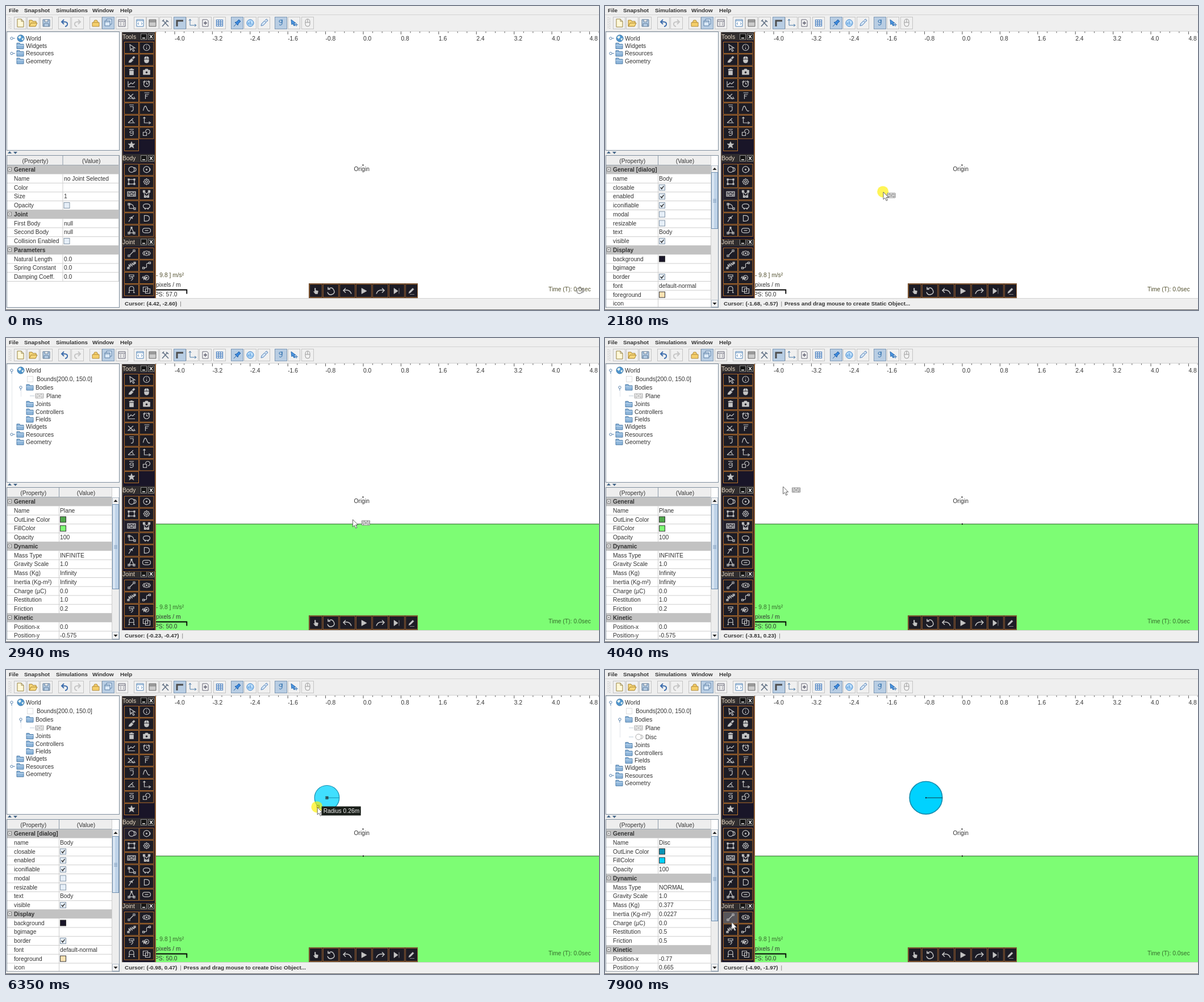
Recreate the animation shown at these times as an HTML page. Size 1044x536 px, loop 8000 ms.

```html
<!DOCTYPE html>
<html lang="en">
<head>
<meta charset="utf-8">
<title>Physics sandbox</title>
<style>
html,body{margin:0;width:100%;height:100%;overflow:hidden;background:#fff}
svg{display:block;width:1044px;height:536px;font:10.3px "Liberation Sans",Arial,sans-serif}
text{white-space:pre;fill:#333}
.b{font-weight:bold;font-size:9.9px}
</style>
</head>
<body>
<svg id="stage" viewBox="0 0 1044 536"><g id="fixed"></g><g id="live"></g></svg>
<script>
const LOOP = 8000, PX = 83, OX = 629, OY = 281;
const ORANGE = '#b5702b', NAVY = '#191528', CELL = '#1d1c25', ICON = '#c4c4c4';

const rect = (x, y, w, h, fill, stroke = 'none', extra = '') =>
  `<rect x="${x}" y="${y}" width="${w}" height="${h}" fill="${fill}" stroke="${stroke}" ${extra}/>`;
const path = (d, stroke = '#333', fill = 'none', w = 1, extra = '') =>
  `<path d="${d}" stroke="${stroke}" fill="${fill}" stroke-width="${w}" ${extra}/>`;
const circle = (x, y, r, fill, stroke = 'none', extra = '') =>
  `<circle cx="${x}" cy="${y}" r="${r}" fill="${fill}" stroke="${stroke}" ${extra}/>`;
const text = (x, y, s, extra = '') => `<text x="${x}" y="${y + 3.6}" ${extra}>${s}</text>`;
const bold = (x, y, s, extra = '') => text(x, y, s, `class="b" ${extra}`);
const at = (x, y, s) => `<g transform="translate(${x} ${y})">${s}</g>`;
const ring = r => `M${-r} 0a${r} ${r} 0 1 0 ${2 * r} 0a${r} ${r} 0 1 0 ${-2 * r} 0`;
const BRICK = 'M-7-4h14v8h-14zM-7-1.3h14M-7 1.4h14M-3-4v2.7M3-4v2.7M0-1.3v2.7M-4 1.4v2.6M4 1.4v2.6';
const DISC = ring(5) + 'M4-3.5q4 0 4 3.5t-4 3.5';

// ---------- toolbar ----------
const SHEET = 'M-5-7h7l4 4v10h-11zM2-7v4h4';
const TOOLBAR = [
  [25, SHEET, '#998440', '#fff8d8'], [48, 'M-7 6v-11h5l1 2h6v3M-7 6l3-6h11l-3 6z', '#a8822d', '#f6d77b'],
  [71, 'M-6-6h12v12h-12zM-3-6v4h6v-4M-4 6v-5h8v5', '#5d7896', '#b9d0e8'],
  [103, 'M-1-6l-4 4 4 4M-5-2h5q6 0 5 5q-1 3-4 3', '#3f6fae', 'none', 0, 2],
  [126, 'M1-6l4 4-4 4M5-2h-5q-6 0-5 5q1 3 4 3', '#c6c6c6', 'none', 0, 2],
  [158, 'M-6-1h12v7h-12zM-4-1l2-4h4l2 4', '#b18b3c', '#f5cf6a'],
  [180, 'M-6-4h9v9h-9zM-3-4v-3h9v9h-3M-6-2h9', '#5a7fa5', '#dceaf8', 1],
  [204, 'M-6-6h12v12h-12zM-6-3h12M-3 0h2M2 0h2M-3 3h2M2 3h2', '#667', '#eee'],
  [236, 'M-6-6h12v12h-12zM-6-4h12M-2-1l-2 2 2 2M2-1l2 2-2 2', '#5285b8', '#fff'],
  [258, 'M-6-6h12v12h-12zM-6-2h12M-6-4h12', '#666', '#ccc'],
  [281, 'M-6 6l8-9M-5-5l10 11M1-5l4 3M-6-3l3-3', '#637286', 'none', 0, 1.6],
  [306, 'M-5 6v-10h11', '#4d4d4d', 'none', 1, 3],
  [328, 'M-4-7v11h11M-6-4l2-3 2 3M4 2l3 2-3 2', '#4a7aa8', 'none'],
  [351, 'M-5-6h8l2 2v10h-10zM-3 0h6M0-3v6' + ring(2), '#667', '#f4f4f4'],
  [376, 'M-5.5-6v12M-1.8-6v12M1.8-6v12M5.5-6v12M-6-5.5h12M-6-1.8h12M-6 1.8h12M-6 5.5h12', '#4a82c4', 'none', 0, 1.2],
  [407, 'M-6 6l4-4M-4-1l5 5 1-3 4-4-3-3-4 4z', '#225fa6', '#3d89dc', 1],
  [430, ring(6) + 'M-3 3v-4M0 3v-6M3 3v-2', '#337fca', '#b9dcfa'],
  [454, 'M-5 5l1-4 5-5 3 3-5 5zM2-5l3-2 2 3-3 2', '#5b86bb', '#cfe2f4'],
  [484, 'M2-5q-5-1-5 2t5 2v-5v8q-2 3-5 1', '#2b6cab', 'none', 1],
  [507, 'M-5-6l1 9 2-2 2 4 2-1-2-4h3zM1 3h6M4 0v6', '#276bb2', '#4b94df'],
  [531, 'M-4-2q0-5 4-5t4 5v4q0 4-4 4t-4-4zM-4-1h8M0-7v6', '#999', '#f3f3f3']
];

function toolbar() {
  let s = rect(0, 0, 1044, 45, '#efefef') + path('M0 15.5h1044M0 44.5h1044', '#d2d2d2');
  [[5, 'File'], [32, 'Snapshot'], [88, 'Simulations'], [152, 'Window'], [201, 'Help']]
    .forEach(([x, label]) => s += bold(x, 7, label));
  for (let y = 20; y < 41; y += 3) s += rect(5, y, 1, 1, '#999') + rect(8, y + 1, 1, 1, '#999');
  for (const [x, d, stroke, fill, on, weight] of TOOLBAR)
    s += rect(x - 10.5, 19.5, 21, 21, on ? '#b8cde3' : '#f0f0f0', on ? '#7f99b5' : '#c4c4c4') +
      at(x, 30, path(d, stroke, fill, weight));
  return s;
}

// ---------- dark tool panels; "*" marks a solid icon ----------
const TOOLS = ['M-3-5l1 10 2-3 3 5 2-1-3-5h4z', ring(5.5) + 'M0-3v1M0 0v3', '*M-5 5l1-3 4-4 3 3-4 4zM1-3l3-3 2 2-3 3z',
  '*M-4-1.5q0-4 3.5-4v4zM.5-5.5q3.5 0 3.5 4h-3.5zM-4 0h8v2q0 4-4 4t-4-4z', '*M-4-3h8v-1.5h-2.5v-1h-3v1h-2.5zM-3.5-1.5h7v7h-7z',
  '*M-6-3h3l1-2h4l1 2h3v8h-12zM-2 1a2 2 0 1 0 4 0a2 2 0 1 0-4 0',
  'M-6-5v10h12M-5 2l4-4 3 2 4-4', ring(5) + 'M0-3v3h3M-6-3l3-3M6-3l-3-3', 'M-6-4l9 8h-9l9-8M4 1l2 3-4 1',
  'M-2 5v-8h6M-2 0h4M-4-6h9', 'M-3-3h6v5q0 3-4 3M-4-6h8', 'M-6 4q3-13 6-5t6 5',
  'M-6 4h12M-6 4l9-8M0-1q3 1 3 5', 'M-4-6v10h9M-6-4l2-2 2 2M4 2l3 2-3 2', 'M3-3q-6-1-6 2t6 1v-3v6q-2 3-6 1M-4-6h8',
  'M-6-1h6v6h-6zM-2-2a4 4 0 1 1 4 4', '*M0-6l1.6 4H6L2.5 1 4 5.5 0 3l-4 2.5L-2.5 1-6-2h4.4z'];
const BODIES = [DISC, ring(5.5) + ring(1) + 'M5-3q3 3 0 6', 'M-5-4h10v8h-10zM-6-5h2v2h-2zM4-5h2v2h-2zM-6 3h2v2h-2zM4 3h2v2h-2z',
  ring(2) + ring(4.5) + 'M0-6v2M0 6v-2M-6 0h2M6 0h-2M-4-4l1 1M4 4l-1-1M4-4l-1 1M-4 4l1-1', BRICK,
  'M-5-5l2 10h6l2-10-5 5zM-6-6h3v3h-3zM3-6h3v3h-3zM-4 3h3v3h-3zM1 3h3v3h-3z', 'M-4 4v-8q8 0 8 8zM-6-5h3v3h-3zM4 3h3v3h-3z',
  'M-6 0q0-4 6-4t6 4-6 4-6-4M-4 3l2 3M4 3l-2 3', 'M-5 6l4-6 5-5M-4-1h6M-1-3l3 4', 'M-4-5h3q6 0 6 5t-6 5h-3z',
  'M0-5l-4 9h8zM-1-6h2v2h-2zM-6 3h3v3h-3zM3 3h3v3h-3z', 'M-3-4h6q4 0 4 4t-4 4h-6q-4 0-4-4t4-4M-3 0h6'];
const JOINTS = ['M-3 3l6-6M-6 3h3v3h-3zM3-6h3v3h-3z', ring(4) + ring(1) + 'M-7 0l3-4M-7 0l3 4M7 0l-3-4M7 0l-3 4',
  'M-6 5l2-3-1-4 3 4 0-5 3 4 0-5 3 3 2-4M-7 3h3v3h-3zM4-6h3v3h-3z', 'M-5 4q6 1 5-4t5-4M-7 3h3v3h-3zM4-6h3v3h-3z',
  'M-4-5h8v3h-8zM0-2q5 4-1 7M-4 1h4', 'M-8 1l2-3 1 5 2-5 1 5 2-4' + ring(4) + ring(1), 'M-4 5v-7q0-4 4-4t4 4v7M-4 1h8M-6 5h3M3 5h3',
  'M-6-5h8v8h-8zM-2-2h8v8h-8z'];
const PLAYER = [[534, 22, '*M-2 1v-6h1.5v4l4.5 1-1 5h-4l-3-4z'], [558, 27, 'M-4-4q6-4 9 2t-3 8q-6 2-8-4M-5-7v4h4'],
  [587, 27, 'M-3-5l-4 4 4 4M-7-1q11-3 14 6'], [616, 27, '*M-4-5l9 5-9 5z'], [645, 27, 'M3-5l4 4-4 4M7-1q-11-3-14 6'],
  [674, 27, '*M-5-5l7 5-7 5zM4-5v10'], [703, 21, '*M-5 4l1-3 6-6 2 2-6 6zM-3 6h8']];

const glyph = (d, w = 1.2) => path(d.replace('*', ''), ICON, d[0] === '*' ? ICON : 'none', d[0] === '*' ? .6 : w, 'fill-rule="evenodd"');
const cell = (x, y, d, back = CELL, edge = ORANGE) => rect(x - 12.5, y - 9.5, 25, 20, back, edge) + at(x, y, glyph(d));

function panel(top, bottom, title, titleY, firstY, icons) {
  let s = rect(204, top, 60, bottom - top, NAVY) + rect(204, top, 60, 15, '#302d2e') +
    path(`M205 ${top}V${bottom}`, '#4c413c', 'none', 2) + path(`M263 ${top}V${bottom}`, '#8a5a30', 'none', 2) +
    text(205, titleY, title, 'style="fill:#eadbc6"');
  for (const x of [242.5, 255.5]) s += rect(x - 5, titleY - 5, 10, 10, '#151515', '#8a8a8a');
  s += path(`M240 ${titleY + 2.5}h5M253 ${titleY - 3}l5 6m0-6l-5 6`, '#eee', 'none', 1.5);
  icons.forEach((d, i) => s += cell(221 + 26.5 * (i % 2), firstY + 21.5 * (i >> 1), d));
  return s;
}

function fixedScene() {
  let s = rect(0, 0, 1044, 536, '#fff') + toolbar();
  for (let v = -22; v <= 25; v++) {
    const x = OX + v * 0.2 * PX;
    s += path(`M${x} 45v${v % 4 ? 2.5 : 5}`, '#555');
    if (v % 4 === 0) s += text(x, 57, (v / 5).toFixed(1));
  }
  s += rect(0, 45, 204, 490, '#ededed') + rect(1.5, 45.5, 198, 209, '#fff', '#7f8f9f') +
    rect(1.5, 263.5, 198, 268, '#fff', '#7f8f9f') + path('M3 260l3.5-4 3.5 4zM13 257l3.5 4 3.5-4z', 'none', '#446688');
  return s + rect(204, 515, 840, 20, '#efefef') + path('M204 515.5h840', '#d0d0d0') + path('M0 535.5h1044', '#666');
}

// ---------- side panel ----------
const folder = (x, y) => at(x, y, path('M-6 5v-10h5l1 2h6v8z', '#4d7ca8', '#8db5da') + path('M-6-1h12', '#c9def1'));
const handle = (x, y, open) => circle(x, y, 2.2, '#fff', '#5b83ad') + path(open ? `M${x} ${y + 2}v4` : `M${x + 2} ${y}h4`, '#5b83ad');

function tree(bodies) {
  let s = at(26, 57, circle(0, 0, 6, '#4f96cf', '#3b77a8') + path('M-5-2l4-3 2 3-3 3zM1 1l4-2-1 5z', 'none', '#e9f3ef')) + text(35, 57, 'World');
  let y = 57;
  const entry = (x, step, label) => { y += step; s += folder(x - 10, y) + text(x, y, label); };
  s += handle(10, 57, bodies.length);
  if (bodies.length) {
    s += rect(37.5, 67.5, 10, 10, 'none', '#bbb', 'stroke-dasharray="1 1"') + text(54, 72, 'Bounds[200.0, 150.0]');
    s += handle(26, 87, true) + path(`M26.5 92V${88 + 15.5 * bodies.length}M10.5 63v103`, '#e2e6ea');
    y = 72;
    entry(52, 15, 'Bodies');
    bodies.forEach((name, i) => {
      y += 15 + i;
      s += path(`M42 ${y}h8`, '#bccbd8') + at(59, y, path(name === 'Disc' ? DISC : BRICK, '#aaa')) + text(71, y, name);
    });
    entry(52, 14.6, 'Joints'); entry(52, 13.5, 'Controllers'); entry(52, 13.3, 'Fields');
  }
  entry(35, 13.3, 'Widgets'); entry(35, 13.3, 'Resources');
  s += handle(10, y, false);
  entry(35, 13.3, 'Geometry');
  return s;
}

// "#" starts a heading; "+" and "-" are check boxes; "@" is a colour swatch
const SHEETS = {
  joint: '#General|Name=no Joint Selected|Color=|Size=1|Opacity=-|#Joint|First Body=null|Second Body=null|Collision Enabled=-|#Parameters|Natural Length=0.0|Spring Constant=0.0|Damping Coeff.=0.0',
  dialog: '#General [dialog]|name=Body|closable=+|enabled=+|iconifiable=+|modal=-|resizable=-|text=Body|visible=+|#Display|background=@#191528|bgimage=|border=+|font=default-normal|foreground=@#ffe3b3|icon=',
  plane: '#General|Name=Plane|OutLine Color=@#4fa94b|FillColor=@#7dfd74|Opacity=100|#Dynamic|Mass Type=INFINITE|Gravity Scale=1.0|Mass (Kg)=Infinity|Inertia (Kg-m²)=Infinity|Charge (µC)=0.0|Restitution=1.0|Friction=0.2|#Kinetic|Position-x=0.0|Position-y=-0.575',
  disc: '#General|Name=Disc|OutLine Color=@#0b93b5|FillColor=@#00d2ff|Opacity=100|#Dynamic|Mass Type=NORMAL|Gravity Scale=1.0|Mass (Kg)=0.377|Inertia (Kg-m²)=0.0227|Charge (µC)=0.0|Restitution=0.5|Friction=0.5|#Kinetic|Position-x=-0.77|Position-y=0.665'
};

function properties(kind) {
  const wide = kind === 'joint', split = wide ? 100 : 93.5, right = wide ? 198.5 : 186.5, vx = split + 1.5;
  let s = rect(2, 264, right - 2, 17, '#eee') + path(`M2 280.5H${right}M${split} 264v17`, '#8c9aa8') +
    text((split + 3) / 2, 273, '(Property)', 'text-anchor="middle"') +
    text((split + right) / 2 + 1, 273, '(Value)', 'text-anchor="middle"');
  SHEETS[kind].split('|').forEach((row, i) => {
    const y = 288.5 + 15.75 * i, h = Math.min(15.75, 531 - (y - 7.8));
    if (row[0] === '#') {
      s += rect(2, y - 7.8, right - 2, h, '#c2c2c2') + rect(3.5, y - 3.5, 6, 6, '#fff', '#777') +
        path(`M5 ${y - .5}h3`, '#222') + bold(14, y, row.slice(1), 'style="font-size:10.2px"');
      return;
    }
    const [name, value] = row.split('=');
    s += path(`M2 ${y - 7.8 + h}H${right}M${split} ${y - 7.8}v${h}`, '#cdcdcd') + text(14, y, name);
    if (value === '+' || value === '-') {
      s += rect(vx + .5, y - 5, 10, 10, '#e6eff8', '#8193a5');
      if (value === '+') s += path(`M${vx + 2.7} ${y - .3}l2 2.7 3.8-5`, '#333', 'none', 1.5);
    } else if (value[0] === '@') s += rect(vx + .5, y - 5, 10, 10, value.slice(1), '#333');
    else s += text(wide ? vx + .5 : vx, y, value);
  });
  s += path(`M${right} 264V${wide ? 486 : 531}`, '#cdcdcd');
  if (!wide) {
    const end = kind === 'dialog' ? 392 : 442, mid = (294 + end) / 2;
    s += rect(187, 281, 12, 250, '#ededed') + rect(187.5, 281.5, 11, 12, '#f3f3f3', '#b7c3cf') +
      rect(187.5, 518.5, 11, 12, '#f3f3f3', '#b7c3cf') + path('M189.5 289l3.5-4 3.5 4zM189.5 523l3.5 4 3.5-4z', 'none', '#222') +
      rect(187.5, 293.5, 11, end - 293, '#bfd3e8', '#6f8fb0') + rect(188, 294, 4, end - 294, '#dbe7f3') +
      path(`M190 ${mid - 2}h6m-6 2.5h6m-6 2.5h6`, '#7897b8');
  }
  return s;
}

// ---------- timeline ----------
const PATH = [[0, 996, 497], [100, 860, 440], [210, 712, 392], [400, 620, 290], [520, 470, 205], [740, 370, 225],
  [850, 290, 270], [960, 240, 315], [1080, 222, 328], [1630, 330, 326], [1730, 489.5, 328], [2290, 505, 328],
  [2400, 540, 328], [2510, 585, 327.5], [2620, 614, 327.5], [2940, 610, 320], [3050, 600, 300], [3160, 588, 278],
  [3270, 575, 258], [3380, 562, 245], [3490, 553, 240], [4040, 313, 262], [4160, 285, 264], [4380, 250, 276],
  [4490, 224, 287], [5240, 350, 268], [5360, 565, 225.5], [5890, 560, 230], [6010, 556, 233.5], [6120, 553, 236],
  [6230, 550, 239], [6350, 547.7, 242], [6450, 545, 243.5], [6570, 543, 246], [7220, 470, 285], [7340, 298, 362],
  [7560, 262, 395], [7680, 238, 425], [7790, 227, 440], [7900, 222.5, 444.5]];
const RADII = [[5670, 0], [5780, 2], [5890, 7], [6010, 11], [6120, 15], [6230, 18.5], [6350, 21.8], [6450, 26], [6570, 28.8]];
const latest = (steps, t) => steps.findLast(step => step[0] <= t);
const within = (t, a, b) => t >= a && t < b;
const grip = (x, y) => rect(x - 2, y - 2, 4, 4, 'none', '#222');

function plane(t, x) {
  const drag = t < 2720;
  let s = rect(264, 328, 780, 187, drag ? '#9dfc96' : '#7dfd74') + path('M264 328h780', drag ? '#4e8a4c' : '#245c22');
  return s + (drag ? grip(489.5, 328) + grip(x, 328) : rect(628, 327, 2, 2, '#111'));
}

function disc(t, x, y) {
  const r = latest(RADII, t)[1], drag = t < 6570, cx = 565, cy = 225.3;
  let s = circle(cx, cy, r, drag ? '#40dfff' : '#00d2ff', '#168eb0', `stroke-width="${drag ? 1.2 : 1.7}"`) +
    path(`M${cx} ${cy}h${r}`, drag ? '#168eb0' : '#123c48');
  if (!drag) return s + rect(cx - 1, cy - 1, 2, 2, '#123');
  const angle = Math.atan2(y - cy, x - cx);
  return s + grip(cx, cy) + rect(cx - 1, cy - 1, 2, 2, '#222') + grip(cx + r * Math.cos(angle), cy + r * Math.sin(angle));
}

function pointer(t, x, y) {
  const pressed = within(t, 1190, 1420) || within(t, 2180, 2720) || within(t, 4810, 5030) || within(t, 5670, 6680);
  const dragging = within(t, 2290, 2720) || within(t, 5780, 6570);
  let s = pressed ? circle(x - .3, y - .6, 10, '#fff000', 'none', 'opacity=".66"') : '';
  if (x > 264 && !dragging) {
    const brick = within(t, 1630, 4490);
    s += brick ? at(x + (t < 2720 ? 14.5 : 23.5), y + 6, path(BRICK, '#888', '#eee'))
      : at(x + 13.5, y + 5, path(DISC, '#8c8c8c', 'none', 1.3));
  }
  if (t >= 100) s += path(`M${x + .5} ${y}v13l3-2.7 2.2 5 2.2-1-2.2-4.8h4z`, '#555', '#fff', .9);
  if (dragging) {
    const label = t < 3000 ? 'Angle 0.0°, Slope 0.0' : `Radius ${(latest(RADII, t)[1] / PX).toFixed(2)}m`;
    const left = x + (t < 3000 ? 6.5 : 8);
    s += rect(left, y - 1.5, t < 3000 ? 101.5 : 69, 16, '#1a1f1a') + text(left + 3, y + 6.6, label, 'style="fill:#f2f2f2"');
  }
  return s;
}

function status(t, x, y) {
  const place = `Cursor: (${((x - OX) / PX).toFixed(2)}, ${((OY - y) / PX).toFixed(2)})`;
  const made = within(t, 1300, 2720) ? 'Static' : within(t, 4920, 6570) ? 'Disc' : '';
  const message = made && `Press and drag mouse to create ${made} Object...`;
  return bold(209, 524, `${place}<tspan dx="5" style="font-weight:normal;fill:#777">|</tspan><tspan dx="4">${message}</tspan>`);
}

function liveScene(t) {
  const [, x, y] = latest(PATH, t);
  const kind = t < 1190 ? 'joint' : t < 2720 ? 'dialog' : t < 4810 ? 'plane' : t < 6570 ? 'dialog' : 'disc';
  const fps = t < 400 ? 57 : t < 740 ? 54 : t < 1950 ? 51 : 50;
  const olive = t < 2290 ? 'style="fill:#53512f"' : 'style="fill:#356b2b"';
  let s = tree(t < 2720 ? [] : t < 6570 ? ['Plane'] : ['Plane', 'Disc']) + properties(kind);

  if (t >= 2290) s += plane(t, x);
  s += rect(627.5, 279.5, 2, 2, '#222') + text(612.5, 287, 'Origin');
  if (t >= 5780) s += disc(t, x, y);
  s += text(264, 474, '- 9.8 ] m/s²', olive) + text(264, 491.5, 'pixels / m') +
    path('M264 500.5h54.3v7', '#000', 'none', 1.8) + text(262, 508, `PS: ${fps}.0`) +
    text(955, 499.5, 'Time (T): 0.0sec', olive);

  const bodyEnd = t < 1190 ? 409 : 412;
  s += panel(46, 261, 'Tools', 54, 73, TOOLS) + panel(409, 515, 'Joint', 416, 436, JOINTS) +
    panel(261, bodyEnd, 'Body', 268.5, 288.3, BODIES) + path(`M204 ${bodyEnd - .5}h60`, '#60401f');
  if (within(t, 1080, 4490)) s += cell(221, 331.3, BRICK, '#211e2b', '#494039');
  if (within(t, 4490, 6570)) s += cell(221, 288.3, DISC, '#211e2b', '#665036');
  if (t >= 7790) s += cell(221, 436, JOINTS[0], '#57555b', '#8a6a47');

  s += rect(533.5, 489.5, 191, 25, NAVY, '#6b4a30');
  for (const [left, w, d] of PLAYER)
    s += rect(left + .5, 490.5, w, 23, CELL, '#8f5c2c') + at(left + w / 2 + .5, 502.5, glyph(d, 1.5));
  return s + status(t, x, y) + pointer(t, x, y);
}

document.getElementById('fixed').innerHTML = fixedScene();
const live = document.getElementById('live');
let shown = '';
function tick(now) {
  const next = liveScene(now % LOOP);
  if (next !== shown) live.innerHTML = shown = next;
  requestAnimationFrame(tick);
}
tick(0);
</script>
</body>
</html>
```
